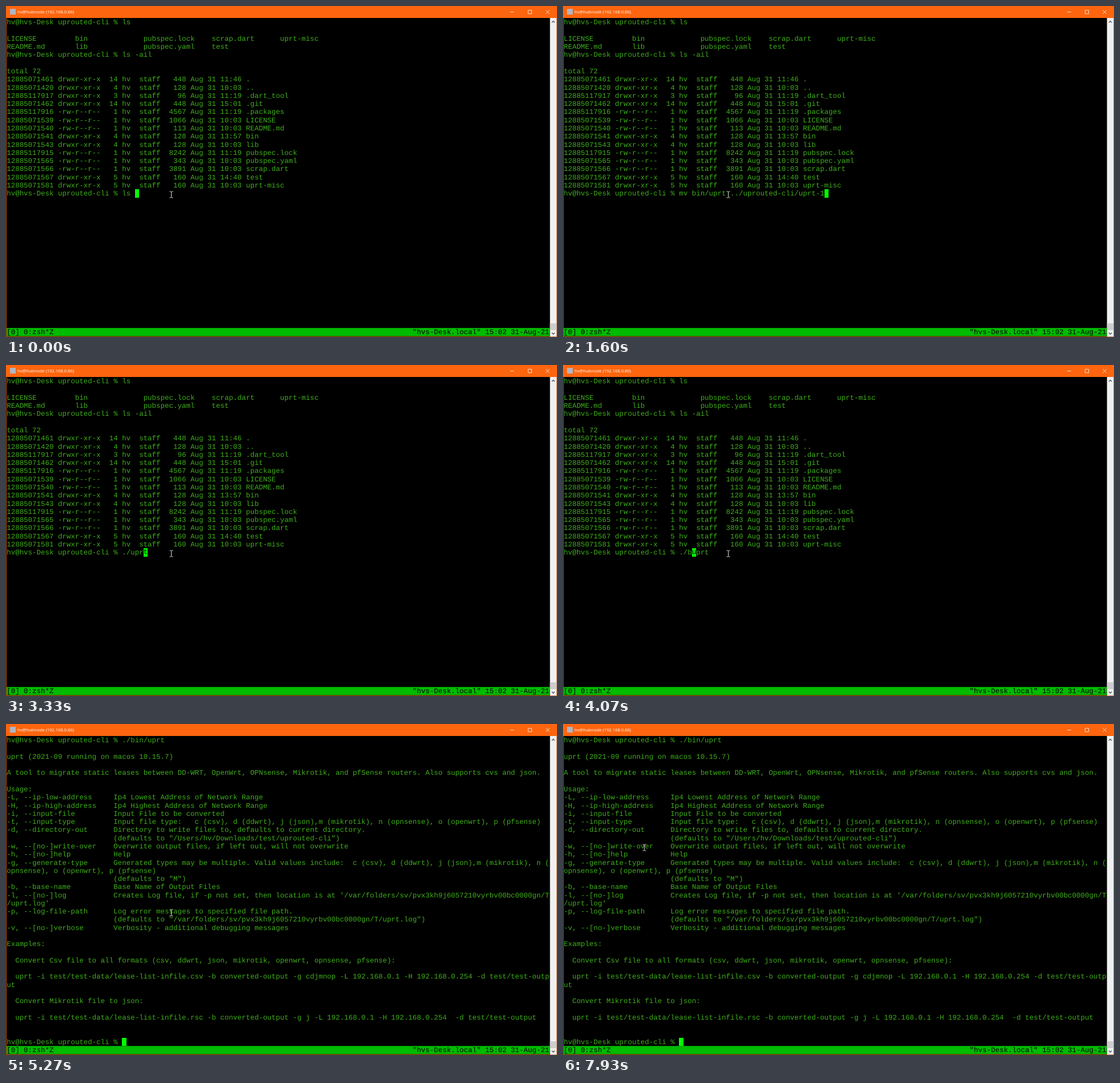
An HTML page that plays this animation: 965 by 580 pixels, repeating every 8000 ms.

```html
<!DOCTYPE html>
<html lang="en">
<head>
<meta charset="utf-8">
<title>Terminal</title>
<style>
  html, body { margin: 0; width: 100%; height: 100%; overflow: hidden; background: #000; }
  #stage { position: relative; width: 965px; height: 580px; overflow: hidden; background: #000; }
  #stage > * { position: absolute; }
  #title { left: 20px; top: 3px; font: 7.6px/15px "Open Sans", sans-serif; color: #fff; white-space: pre; }
  pre, #cursor { margin: 0; font: 12.483px/14.28px "Liberation Mono", monospace; text-rendering: geometricPrecision; }
  pre { left: 1.2px; top: 22.3px; color: #3eae1a; }
  #status { top: 564.9px; color: #000; }
  #cursor { width: 1ch; height: 14.28px; background: #0f0; color: #000; white-space: pre; }
  svg { left: 0; top: 0; }
</style>
</head>
<body>
<div id="stage">
  <svg width="965" height="580" fill="none">
    <path fill="#fd650e" d="M0 0H965V580H0ZM.7 21V579.3H964.3V21Z" fill-rule="evenodd"/>
    <rect x="1.2" y="564.2" width="951.2" height="14.3" fill="#00bb00"/>
    <rect x="952.7" y="21" width="11.6" height="558.3" fill="#f0f0f0"/>
    <rect x="952.7" y="556" width="11.6" height="12" fill="#cdcdcd"/>
    <path stroke="#505050" stroke-width="1.3" d="M956 29l2.5-2.5 2.5 2.5M956 572.5l2.5 2.5 2.5-2.5"/>
    <path stroke="#fff" stroke-width=".8" d="M883 10.6h6.8M914.4 7.4h6.2v6.2h-6.2zM945.4 7.2l6.5 6.5m0-6.5l-6.5 6.5"/>
    <rect x="7" y="5" width="10" height="10" fill="#b4b4c0"/>
  </svg>
  <pre id="screen"></pre>
  <div id="cursor"></div>
  <pre id="status"></pre>
  <svg width="965" height="580" fill="none">
    <path id="mouse" stroke="#ddd" d="M-3-5.5h2l1 1 1-1h2M0-4.5v9M-3 5.5h2l1-1 1 1h2"/>
  </svg>
  <div id="title">hv@hubnode (192.168.0.86)</div>
</div>
<script>
const LOOP = 8000;
const PROMPT = 'hv@hvs-Desk uprouted-cli % ';

const LISTING = `${PROMPT}ls

LICENSE         bin             pubspec.lock    scrap.dart      uprt-misc
README.md       lib             pubspec.yaml    test
${PROMPT}ls -ail

total 72
12885071461 drwxr-xr-x  14 hv  staff   448 Aug 31 11:46 .
12885071420 drwxr-xr-x   4 hv  staff   128 Aug 31 10:03 ..
12885117917 drwxr-xr-x   3 hv  staff    96 Aug 31 11:19 .dart_tool
12885071462 drwxr-xr-x  14 hv  staff   448 Aug 31 15:01 .git
12885117916 -rw-r--r--   1 hv  staff  4567 Aug 31 11:19 .packages
12885071539 -rw-r--r--   1 hv  staff  1066 Aug 31 10:03 LICENSE
12885071540 -rw-r--r--   1 hv  staff   113 Aug 31 10:03 README.md
12885071541 drwxr-xr-x   4 hv  staff   128 Aug 31 13:57 bin
12885071543 drwxr-xr-x   4 hv  staff   128 Aug 31 10:03 lib
12885117915 -rw-r--r--   1 hv  staff  8242 Aug 31 11:19 pubspec.lock
12885071565 -rw-r--r--   1 hv  staff   343 Aug 31 10:03 pubspec.yaml
12885071566 -rw-r--r--   1 hv  staff  3891 Aug 31 10:03 scrap.dart
12885071567 drwxr-xr-x   5 hv  staff   160 Aug 31 14:40 test
12885071581 drwxr-xr-x   5 hv  staff   160 Aug 31 10:03 uprt-misc
${PROMPT}`;

const HELP = `${PROMPT}./bin/uprt

uprt (2021-09 running on macos 10.15.7)

A tool to migrate static leases between DD-WRT, OpenWrt, OPNsense, Mikrotik, and pfSense routers. Also supports cvs and json.

Usage:
-L, --ip-low-address     Ip4 Lowest Address of Network Range
-H, --ip-high-address    Ip4 Highest Address of Network Range
-i, --input-file         Input File to be converted
-t, --input-type         Input file type:   c (csv), d (ddwrt), j (json),m (mikrotik), n (opnsense), o (openwrt), p (pfsense)
-d, --directory-out      Directory to write files to, defaults to current directory.
                         (defaults to "/Users/hv/Downloads/test/uprouted-cli")
-w, --[no-]write-over    Overwrite output files, if left out, will not overwrite
-h, --[no-]help          Help
-g, --generate-type      Generated types may be multiple. Valid values include:  c (csv), d (ddwrt), j (json),m (mikrotik), n (
opnsense), o (openwrt), p (pfsense)
                         (defaults to "M")
-b, --base-name          Base Name of Output Files
-l, --[no-]log           Creates Log file, if -p not set, then location is at '/var/folders/sv/pvx3kh9j6057210vyrbv00bc0000gn/T
/uprt.log'
-p, --log-file-path      Log error messages to specified file path.
                         (defaults to "/var/folders/sv/pvx3kh9j6057210vyrbv00bc0000gn/T/uprt.log")
-v, --[no-]verbose       Verbosity - additional debugging messages

Examples:

  Convert Csv file to all formats (csv, ddwrt, json, mikrotik, openwrt, opnsense, pfsense):

  uprt -i test/test-data/lease-list-infile.csv -b converted-output -g cdjmnop -L 192.168.0.1 -H 192.168.0.254 -d test/test-outp
ut

  Convert Mikrotik file to json:

  uprt -i test/test-data/lease-list-infile.rsc -b converted-output -g j -L 192.168.0.1 -H 192.168.0.254  -d test/test-output


${PROMPT}`;

// [start ms, command line, cursor offset from the prompt's end]
const EDITS = [
  [0, 'ls ', 3],
  [600, 'clear', 5],
  [930, 'cls', 3],
  [1070, 'cd ..', 5],
  [1400, './uprt', 6],
  [1600, 'mv bin/uprt ../uprouted-cli/uprt-1', 34],
  [2000, './uprt', 6],
  [3330, './uprt', 5],
  [3470, './uprt', 4],
  [3600, './uprt', 3],
  [3730, './uprt', 2],
  [4070, './buprt', 3],
  [4130, './biuprt', 4],
  [4200, './binuprt', 5],
  [4470, './bin/uprt', 6],
  [5200, './bin/uprt', -PROMPT.length],
  [5270, '', 0],
];

// [start ms, x, y]
const MOUSE = [
  [0, 289.5, 330.5],
  [6800, 275, 318],
  [6870, 208, 262],
  [6930, 122, 192],
  [7000, 68, 150],
  [7070, 53.5, 138],
  [7600, 44, 116],
  [7670, 25, 76],
  [7730, 16.5, 60],
  [7800, 45, 95],
  [7870, 108, 176],
  [7930, 142.5, 216.5],
];

const $ = id => document.getElementById(id);
const at = (steps, t) => steps.findLast(step => step[0] <= t);
$('status').textContent = '[0] 0:zsh*Z'.padEnd(95) + '"hvs-Desk.local" 15:02 31-Aug-21';

let shown;
function draw() {
  const t = performance.now() % LOOP;
  const edit = at(EDITS, t);
  if (edit !== shown) {
    shown = edit;
    const [start, command, offset] = edit;
    const text = (start < 5270 ? LISTING : HELP) + command;
    const rows = text.split('\n');
    const row = rows.length - 1;
    const col = PROMPT.length + offset;
    $('screen').textContent = text;
    $('cursor').textContent = rows[row][col] || ' ';
    $('cursor').style.left = `calc(1.2px + ${col}ch)`;
    $('cursor').style.top = `${21.6 + row * 14.28}px`;
  }
  const [, x, y] = at(MOUSE, t);
  $('mouse').setAttribute('transform', `translate(${x} ${y})`);
  requestAnimationFrame(draw);
}
draw();
</script>
</body>
</html>
```
